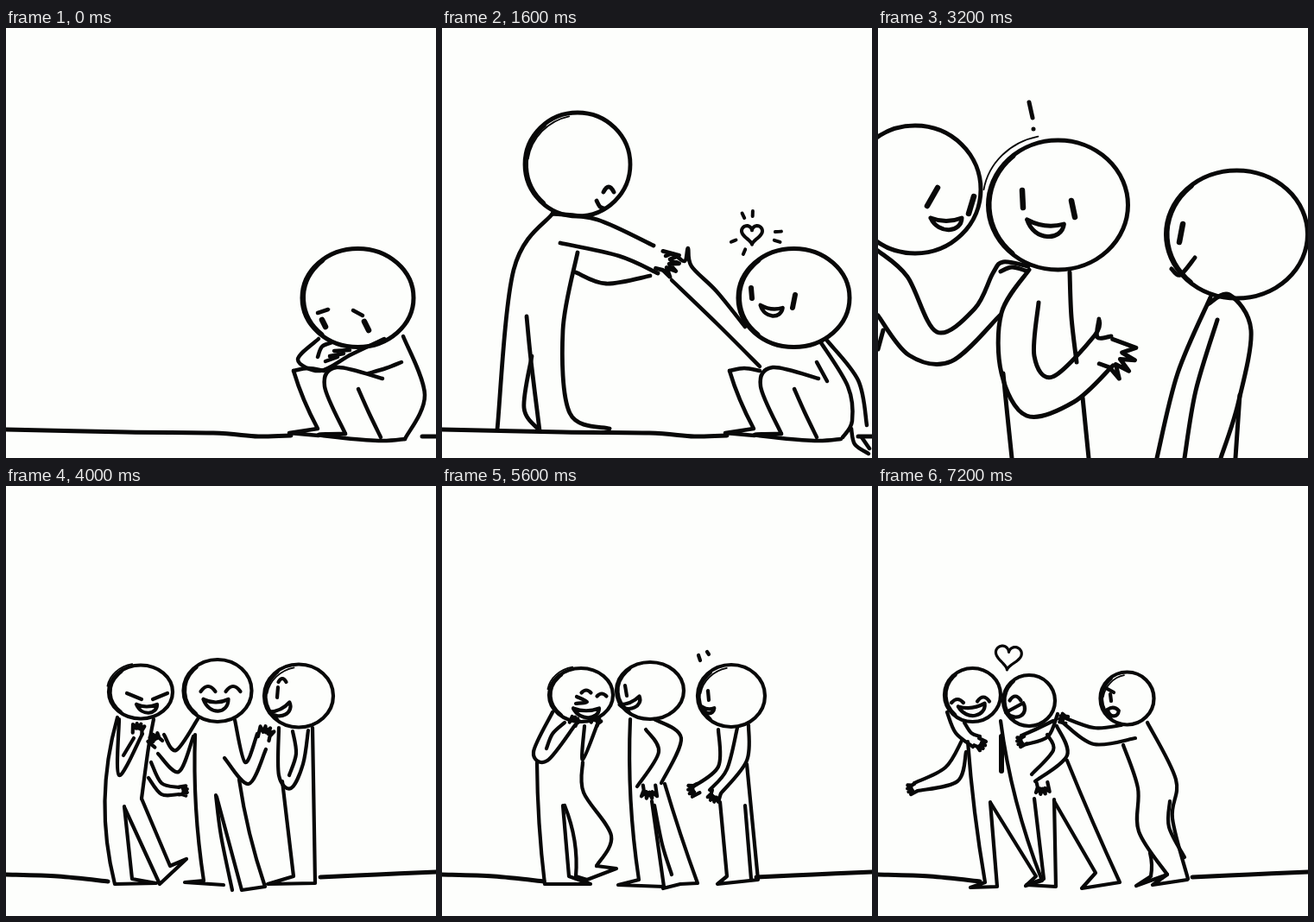
An HTML page with a canvas for the animation above (8000 ms loop, 498 px wide and 498 px high).

```html
<!DOCTYPE html>
<html lang="en">
<head>
<meta charset="utf-8">
<title>Friends</title>
<style>
html, body { margin: 0; width: 100%; height: 100%; overflow: hidden; background: #fdfefc; }
canvas { display: block; }
</style>
</head>
<body>
<canvas id="stage" width="498" height="498"></canvas>
<script>
const ctx = document.getElementById("stage").getContext("2d");
const INK = "#080808", PAPER = "#fdfefc";
ctx.lineCap = ctx.lineJoin = "round";

const pen = width => { ctx.lineWidth = width; };

function draw(trace) {
  ctx.beginPath();
  trace();
  ctx.stroke();
}

// Runs a drawing in its own moved and turned frame.
function placed(x, y, turn, action) {
  ctx.save();
  ctx.translate(x, y);
  ctx.rotate(turn);
  action();
  ctx.restore();
}

// Smooth stroke through x, y pairs.
function line(...c) {
  const last = c.length / 2 - 1;
  const at = i => c.slice(2 * Math.max(0, Math.min(last, i)));
  draw(() => {
    ctx.moveTo(c[0], c[1]);
    for (let i = 0; i < last; i++) {
      const [ax, ay] = at(i - 1), [bx, by] = at(i), [cx, cy] = at(i + 1), [dx, dy] = at(i + 2);
      ctx.bezierCurveTo(bx + (cx - ax) / 6, by + (cy - ay) / 6, cx - (dx - bx) / 6, cy - (dy - by) / 6, cx, cy);
    }
  });
}

const dot = (x, y) => line(x, y, x, y);

// Oval with a heavier left side and an optional thin second outline.
function head(x, y, rx, ry, sketch = 0) {
  draw(() => ctx.ellipse(x, y, rx, ry, 0, 0, 7));
  draw(() => ctx.ellipse(x + 1.5, y, rx, ry, 0, 2.3, 4));
  if (!sketch) return;
  ctx.save();
  pen(1.8);
  draw(() => ctx.ellipse(x - sketch, y - sketch, rx, ry, 0, 3.3, 4.5));
  ctx.restore();
}

// Crescent; lip is how far the upper edge sags compared with the lower one.
function mouth(x, y, w, h, tilt = 0, lip = 0.25) {
  placed(x, y, tilt, () => draw(() => {
    ctx.moveTo(-w / 2, -h / 2);
    ctx.quadraticCurveTo(0, h * (2 * lip - 0.5), w / 2, -h / 2);
    ctx.bezierCurveTo(w / 2, h * 0.7, -w / 4, h * 0.9, -w / 2, -h / 2);
  }));
}

function hump(x, y, w, h) {
  draw(() => {
    ctx.moveTo(x - w / 2, y + h / 2);
    ctx.quadraticCurveTo(x, y - 1.5 * h, x + w / 2, y + h / 2);
  });
}

// Four fanned fingers.
function hand(x, y, angle, size) {
  const polar = (r, a) => ctx.lineTo(x + r * Math.cos(a), y + r * Math.sin(a));
  draw(() => {
    polar(size * 0.45, angle - 1.5);
    for (let i = 0; i < 4; i++) {
      const a = angle + (i - 1.5) * 0.4;
      polar(size, a);
      polar(size * 0.55, a + 0.2);
    }
    polar(size * 0.45, angle + 1.5);
  });
}

// Outer side, toe and inner side of a leg; bend bows the outer side sideways.
function leg(bend, ax, ay, ankleX, ankleY, ...rest) {
  draw(() => {
    ctx.moveTo(ax, ay);
    ctx.quadraticCurveTo((ax + ankleX) / 2 + bend, (ay + ankleY) / 2, ankleX, ankleY);
    for (let i = 0; i < rest.length; i += 2) ctx.lineTo(rest[i], rest[i + 1]);
  });
}

function heart(x, y, size, tilt = 0) {
  const k = size / 16;
  placed(x, y, tilt, () => draw(() => {
    for (let t = 0; t < 6.3; t += 0.1) {
      const rise = 13 * Math.cos(t) - 5 * Math.cos(2 * t) - 2 * Math.cos(3 * t) - Math.cos(4 * t);
      ctx.lineTo(k * 16 * Math.sin(t) ** 3, -k * rise);
    }
  }));
}

function rays(x, y, radius, length, ...degrees) {
  for (const deg of degrees)
    placed(x, y, deg * Math.PI / 180, () => line(radius, 0, radius + length, 0));
}

function bang(x, y, length) {
  line(x, y, x + 4, y + length);
  dot(x + 5, y + length + 13);
}

// Meeting
function crouched() {
  pen(5);
  line(0, 465, 140, 468, 240, 469, 292, 473, 330, 472);
  line(482, 473, 498, 473);
  head(407.5, 312.5, 64.5, 57);
  pen(4.5);
  leg(-4, 333, 397, 361, 464, 328, 469, 362, 472);
  line(333, 397, 350, 394, 368, 397);
  line(393, 470, 369, 415, 383, 393, 436, 406);
  line(408, 418, 420, 445, 434, 474);
  line(393, 470, 362, 471, 392, 475, 435, 478, 462, 476);
}

function huggedKnees() {
  line(460, 357, 485, 425, 462, 476);
  line(362, 360, 338, 384, 364, 397, 400, 378, 438, 360);
  line(361, 381, 366, 369, 378, 364);
  for (let i = 0; i < 3; i++) line(370 + 5 * i, 386 - 6 * i, 384 + 7 * i, 381 - 4 * i);
  line(420, 400, 440, 394, 458, 387);
}

function stander() {
  pen(4.8);
  head(157, 158, 61, 60, -3);
  line(128, 215, 83, 280, 64, 465);
  line(128, 215, 180, 222, 245, 252);
  line(137, 249, 205, 264, 250, 284);
  hand(251, 268, 0.4, 24);
  line(157, 260, 140, 350, 148, 446, 194, 464);
  line(98, 334, 103, 385, 113, 466);
  line(104, 380, 95, 440, 113, 466);
}

function crying() {
  crouched();
  huggedKnees();
  line(361, 330, 373, 326);
  line(402, 327, 413, 333);
  pen(6.5);
  line(366, 338, 370, 346);
  line(415, 340, 420, 350);
}

function offering() {
  crouched();
  huggedKnees();
  hump(382, 341, 16, -4);
  pen(6);
  line(360, 309, 362, 321);
  line(408, 314, 407, 329);
  stander();
  line(188, 164, 186, 177);
  hump(186, 202, 16, -5);
}

function holdingHands() {
  crouched();
  mouth(381, 328, 26, 11, 0.12);
  line(266, 292, 318, 342, 368, 392);
  line(351, 346, 318, 305, 289, 276, 285, 255, 281, 270, 268, 262, 259, 264);
  line(434, 387, 446, 409);
  line(438, 363, 470, 415, 475, 455, 464, 474);
  line(446, 362, 482, 408, 492, 460);
  line(474, 464, 478, 482, 494, 493);
  line(486, 474, 495, 487);
  pen(4);
  heart(359, 238, 12);
  rays(359, 238, 20, 6, 158, 113, -116, -88);
  rays(359, 238, 27, 7, -4, 17);
  pen(6);
  line(358, 301, 359, 313);
  line(409, 309, 406, 324);
  stander();
  hump(193, 187, 12, 6);
  line(179, 200, 183, 207, 188, 209);
  line(155, 283, 190, 296, 241, 287);
}

// Close-ups
function talker() {
  pen(5);
  head(131.5, 205, 81, 75, 6);
  line(98, 280, 66, 330, 66, 400, 95, 449, 150, 433, 195, 391);
  line(109, 318, 104, 380, 125, 404, 174, 356, 179, 337, 177, 358, 193, 357);
  hand(186, 374, 0.5, 36);
  line(145, 283, 147, 335, 153, 387);
  line(68, 400, 73, 450, 78, 498);
  line(160, 428, 167, 498);
}

function listener() {
  pen(5);
  head(338.5, 239, 82, 74);
  line(308, 312, 270, 400, 246, 498);
  line(316, 338, 291, 420, 278, 498);
  line(305, 320, 330, 309, 355, 350, 340, 435, 320, 498);
  line(342, 425, 337, 498);
}

function laughing() {
  talker();
  mouth(167, 249, 36, 14, 0.9, -0.2);
  rays(165, 254, 37, 17, 16, 39, 62);
  pen(6);
  line(189, 212, 181, 229);
  listener();
  line(278, 236, 284, 223, 298, 221);
  mouth(275, 269, 38, 14, -0.8, -0.2);
  rays(272, 266, 28, 17, 148, 122, 100);
  for (let i = 0; i < 3; i++) bang(281 + 15 * i, 111 - i, 24 - i);
  heart(326, 78, 22, -0.15);
  heart(400, 66, 25, 0.6);
  heart(361, 127, 15, 0.3);
}

function newcomer() {
  placed(77, 0, 0, talker);
  mouth(193, 233, 43, 17, 0.12);
  bang(175, 86, 18);
  placed(77, 0, 0, listener);
  line(340, 279, 350, 286, 367, 266);
  head(43, 187, 76, 74);
  mouth(79, 227, 36, 14);
  line(0, 258, 34, 288, 68, 352, 112, 325, 133, 284, 145, 271, 174, 276);
  line(142, 282, 155, 277, 171, 281);
  line(0, 333, 36, 379, 85, 386, 141, 333);
  line(6, 350, 0, 372);
  pen(6.5);
  line(167, 188, 168, 208);
  line(224, 200, 228, 219);
  line(353, 227, 349, 248);
  line(69, 185, 57, 206);
  line(111, 195, 105, 215);
}

// Three friends
function ground() {
  pen(5);
  line(0, 450, 60, 452, 118, 458);
  line(364, 453, 430, 450, 498, 447);
  pen(4.2);
}

function trio(laugh) {
  ground();
  head(156, 238.5, 37, 31, 2);
  leg(-26, 129, 268, 126, 461, 174, 460, 146, 455, 137, 371);
  line(131, 270, 131, 335, 158, 287);
  line(136, 312, 148, 292);
  hand(152, 287, -1.4, 12);
  line(171, 270, 165, 303, 157, 362);
  leg(0, 157, 362, 190, 440, 209, 432, 178, 461, 138, 374);
  line(165, 338, 180, 357, 200, 357);
  line(168, 320, 180, 344, 200, 349);
  hand(200, 353, 0, 10);

  head(245, 237, 39.5, 36);
  line(222, 270, 197, 306, 183, 288);
  line(217, 290, 200, 331, 176, 310);
  hand(177, 299, -2.3, 13);
  line(265, 271, 277, 320, 291, 287);
  line(253, 315, 281, 345, 301, 305);
  hand(298, 293, -1.2, 15);
  leg(-8, 219, 288, 229, 457, 207, 459, 252, 462);
  line(243, 358, 249, 405, 262, 468);
  leg(-6, 270, 340, 300, 464, 273, 468, 244, 360);

  head(339, 243, 40, 36.5, -3);
  line(316, 280, 316, 335, 330, 350, 344, 322, 350, 283);
  line(332, 284, 336, 310, 328, 335);
  leg(0, 320, 342, 333, 452, 303, 461, 358, 460, 355, 280);
  mouth(319, 261, 26, 11, -0.45);
  hump(320, 225, 9, 4);

  mouth(163, 258, 24, 10);
  mouth(243, 254, 29, 14);
  for (const x of [234, 263]) hump(x, 235, 17, 6);
  line(140, 240, 157, 247);
  line(170, 247, 187, 240);
  if (laugh) {
    hump(316, 238, 12, 5);
    rays(245, 235, 66, 18, -110, -90, -70);
    rays(156, 238, 80, 16, -165, -150);
  } else {
    line(315, 233, 314, 245);
  }
}

function gossip() {
  ground();
  head(161, 242, 37, 31, 2);
  line(156, 244, 168, 250, 155, 252);
  hump(167, 238, 11, 3);
  hump(185, 242, 11, 3);
  mouth(167, 263, 30, 11);
  line(128, 262, 106, 308, 122, 318, 154, 277);
  line(142, 274, 128, 287, 121, 304);
  line(165, 278, 163, 317, 181, 273);
  for (const x of [151, 176]) hand(x, 276, -1, 9);
  leg(-4, 110, 320, 119, 461, 172, 461, 147, 452, 140, 370);
  line(163, 320, 164, 355, 196, 405, 179, 440);
  leg(10, 142, 370, 155, 452, 168, 456, 202, 443, 179, 440);

  head(241, 237, 39, 33);
  line(212, 231, 214, 243);
  mouth(219, 253, 25, 10, -0.4);
  leg(-9, 218, 270, 228, 456, 204, 462, 257, 464, 243, 365);
  leg(-2, 258, 345, 296, 460, 276, 461, 256, 466);
  line(246, 370, 255, 415, 266, 450);
  line(246, 270, 277, 292, 254, 344);
  line(236, 282, 251, 308, 226, 348);
  hand(240, 346, 1.57, 16);

  head(335, 243, 39, 36, -3);
  line(308, 237, 309, 248);
  mouth(308, 260, 14, 7, 0.1);
  line(297, 196, 299, 202);
  line(307, 192, 309, 195);
  line(320, 282, 320, 325, 288, 350);
  hand(297, 350, 2.8, 12);
  line(342, 280, 330, 328, 310, 352);
  line(355, 277, 353, 318, 323, 356);
  hand(318, 354, 2, 12);
  leg(0, 322, 366, 330, 452, 319, 461, 366, 456, 353, 322);
  line(351, 370, 358, 455);
}

function hug(reaching) {
  const palmX = reaching ? 42 : 64;
  ground();
  head(109.5, 242, 32.5, 31);
  hump(92, 249, 14, 4);
  hump(122, 247, 14, 5);
  mouth(109, 260, 31, 13, -0.12);
  line(97, 295, 78, 326, palmX, 344);
  line(102, 308, 92, 342, palmX + 4, 353);
  hand(palmX + 2, 349, 2.8, 10);
  line(80, 262, 90, 286, 110, 302);
  line(100, 274, 108, 286, 118, 290);
  hand(114, 296, 0.6, 11);
  leg(-4, 104, 296, 124, 459, 107, 465, 138, 464, 130, 366);
  leg(-12, 142, 272, 190, 457, 171, 463, 183, 452, 131, 368);

  head(175, 248.5, 30, 29.5);
  hump(159, 246, 13, 5);
  mouth(161, 262, 23, 12, -0.5, 0);
  line(208, 264, 197, 290, 172, 299);
  line(203, 272, 180, 283, 166, 289);
  hand(171, 294, 2.8, 10);
  line(207, 278, 219, 312, 182, 342);
  line(196, 288, 203, 306, 178, 334);
  hand(190, 343, 1.5, 14);
  leg(0, 181, 362, 192, 455, 172, 462, 206, 464, 204, 363);
  leg(-2, 219, 318, 280, 459, 236, 466, 252, 448, 204, 365);

  head(288.5, 246, 31, 30.5, -3);
  line(269, 241, 270, 249);
  line(262, 233, 273, 239);
  mouth(272, 263, 13, 7, 0.1, -0.4);
  line(312, 274, 345, 340, 341, 385, 359, 455);
  line(284, 300, 301, 350, 302, 400, 335, 450);
  line(338, 365, 337, 395, 355, 430);
  leg(3, 315, 425, 316, 452, 299, 463, 335, 450, 318, 462, 358, 456);
  if (reaching) {
    line(215, 268, 250, 280, 282, 277);
    line(214, 274, 250, 299, 298, 292);
    hand(219, 271, -2.8, 9);
    pen(3.2);
    heart(151, 197, 15, 0.1);
  } else {
    line(285, 280, 282, 315, 270, 345);
    line(302, 295, 296, 330, 280, 350);
    hand(276, 347, 2, 11);
  }
  pen(6);
  line(143, 290, 143, 330);
}

const scenes = [
  crying, offering, holdingHands, laughing, newcomer,
  () => trio(false), () => trio(true), gossip, () => hug(false), () => hug(true),
];

function frame() {
  const scene = Math.floor(performance.now() / 800) % scenes.length;
  ctx.fillStyle = PAPER;
  ctx.fillRect(0, 0, 498, 498);
  ctx.strokeStyle = INK;
  scenes[scene]();
  requestAnimationFrame(frame);
}
frame();
</script>
</body>
</html>
```
